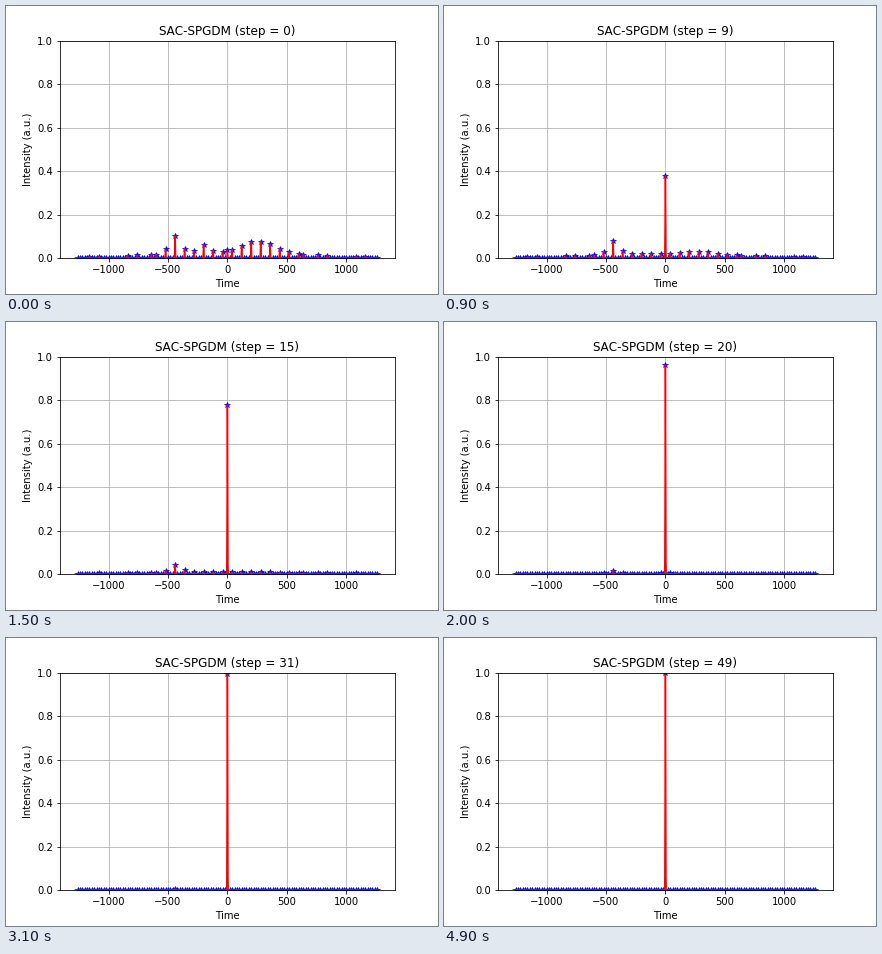
A matplotlib script that plays this animation: 432 px wide and 288 px high, repeating every 5 s.

```python
import numpy as np
import matplotlib.pyplot as plt
from matplotlib.animation import FuncAnimation

plt.rcParams["font.family"] = "DejaVu Sans"
plt.rcParams["text.kerning_factor"] = 6

STEPS = 50
SPACING = 20
slots = np.arange(-63, 64)
time = np.arange(-1280, 1281)
reach = abs(slots)

# Side pulses sit on every fourth slot, more sparsely beyond the middle.
side = (slots % 4 == 2) & ((reach < 32) | np.isin(slots % 16, (6, 10))) | (reach == 32)

# Bumps of side pulses: middle slot, width, height, fading power.
BUMPS = [(0, 50, 0.022, 0.7), (13, 10, 0.055, 3), (-10, 3.5, 0.040, 5), (-22, 3.5, 0.083, 0.6)]


def logit(p):
    return np.log(p / (1 - p))


def center_height(step):
    level = np.interp(step, [0, 9, 15, 20, 31, 49],
                      logit(np.array([0.035, 0.377, 0.777, 0.961, 0.995, 0.9995])))
    return 1 / (1 + np.exp(-level))


def heights(step):
    center = center_height(step)
    remaining = (1 - center) / (1 - center_height(0))
    values = sum(height * remaining ** power * np.exp(-((slots - middle) / width) ** 2)
                 for middle, width, height, power in BUMPS) * side
    values[slots == 0] = center
    return values


def pulse_train(values):
    offset = (time + SPACING // 2) % SPACING - SPACING // 2
    index = np.clip((time - offset) // SPACING + 63, 0, len(slots) - 1)
    return values[index] * np.exp(-(offset / 3) ** 2)


fig, ax = plt.subplots(figsize=(6, 4), dpi=72)
fig.subplots_adjust(left=0.125, right=0.9, bottom=0.125, top=0.88)
stars, = ax.plot(slots * SPACING, 0 * slots, "b*", markeredgewidth=0.6)
trace, = ax.plot(time, 0 * time, "r-")
ax.set(xlim=(-1408, 1408), ylim=(0, 1), xlabel="Time", ylabel="Intensity (a.u.)")
ax.grid(True)
title = ax.set_title("")


def draw(step):
    values = heights(step)
    trace.set_ydata(pulse_train(values))
    stars.set_ydata(values)
    title.set_text(f"SAC-SPGDM (step = {step})")
    return trace, stars, title


anim = FuncAnimation(fig, draw, frames=STEPS, interval=100, repeat=True, repeat_delay=0)
plt.show()
```
